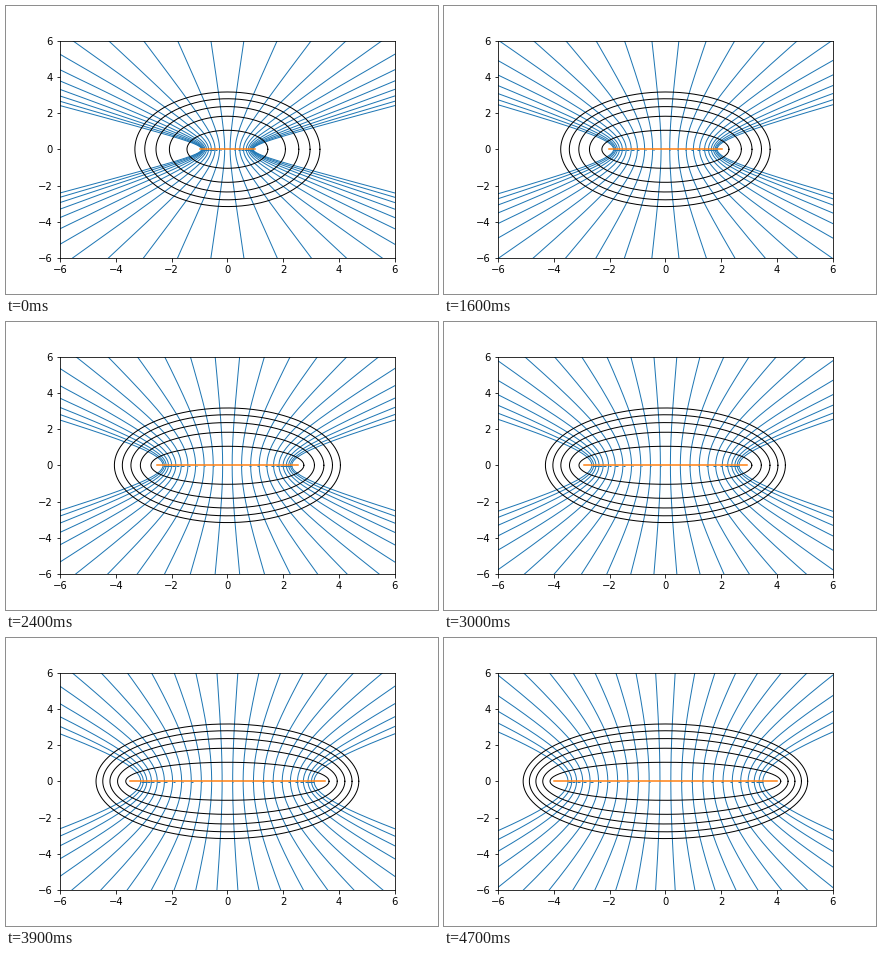
Write a matplotlib script that moves like this. It is 432 px wide and 288 px high and loops after 4.8 s.

```python
import numpy as np
import matplotlib.pyplot as plt
from matplotlib.animation import FuncAnimation

# Field lines and equipotentials of a uniformly charged rod that grows.
FRAMES = 48
SPAN = 6
BLUE, ORANGE = "C0", "C1"

lengths = np.linspace(1, 4, FRAMES)
seeds = np.linspace(-5, 5, 24)       # every field line passes (seed, +-2)
levels = np.linspace(1.1, 10, 5)     # squared minor half axes
y = SPAN * np.linspace(-1, 1, 401) ** 3
angle = np.linspace(0, 2 * np.pi, 361)

plt.rcParams.update({"font.family": "DejaVu Sans", "font.size": 10})
fig = plt.figure(figsize=(6, 4), dpi=72, facecolor="white")
ax = fig.add_axes([0.125, 0.125, 0.775, 0.755])
ax.set(xlim=(-SPAN, SPAN), ylim=(-SPAN, SPAN),
       xticks=range(-6, 7, 2), yticks=range(-6, 7, 2))


def make_lines(count, **style):
    return [ax.plot([], [], **style)[0] for _ in range(count)]


field = make_lines(len(seeds), color=BLUE, lw=1)
tails = make_lines(len(seeds), color=BLUE, lw=1, solid_capstyle="butt")
shells = make_lines(len(levels), color="black", lw=1)
rod, = make_lines(1, color=ORANGE, lw=1.5)


def vertex(x, half):
    """Where the confocal hyperbola through (x, 2) crosses the rod."""
    return (np.hypot(x + half, 2) - np.hypot(x - half, 2)) / 2


def update(i):
    half = lengths[i]
    for line, tail, x in zip(field, tails, seeds):
        a = vertex(x, half)
        line.set_data(a * np.sqrt(1 + y**2 / (half**2 - a**2)), y)
        # short stub running inward just below the rod
        tail.set_data([a, a - 0.14 * a / half], [-0.06, -0.06])
    for shell, level in zip(shells, levels):
        shell.set_data(np.sqrt(half**2 + level) * np.cos(angle),
                       np.sqrt(level) * np.sin(angle))
    rod.set_data([-half, half], [0, 0])
    return [*field, *tails, *shells, rod]


anim = FuncAnimation(fig, update, frames=FRAMES, interval=100,
                     repeat=True, repeat_delay=0, blit=False)
plt.show()
```
